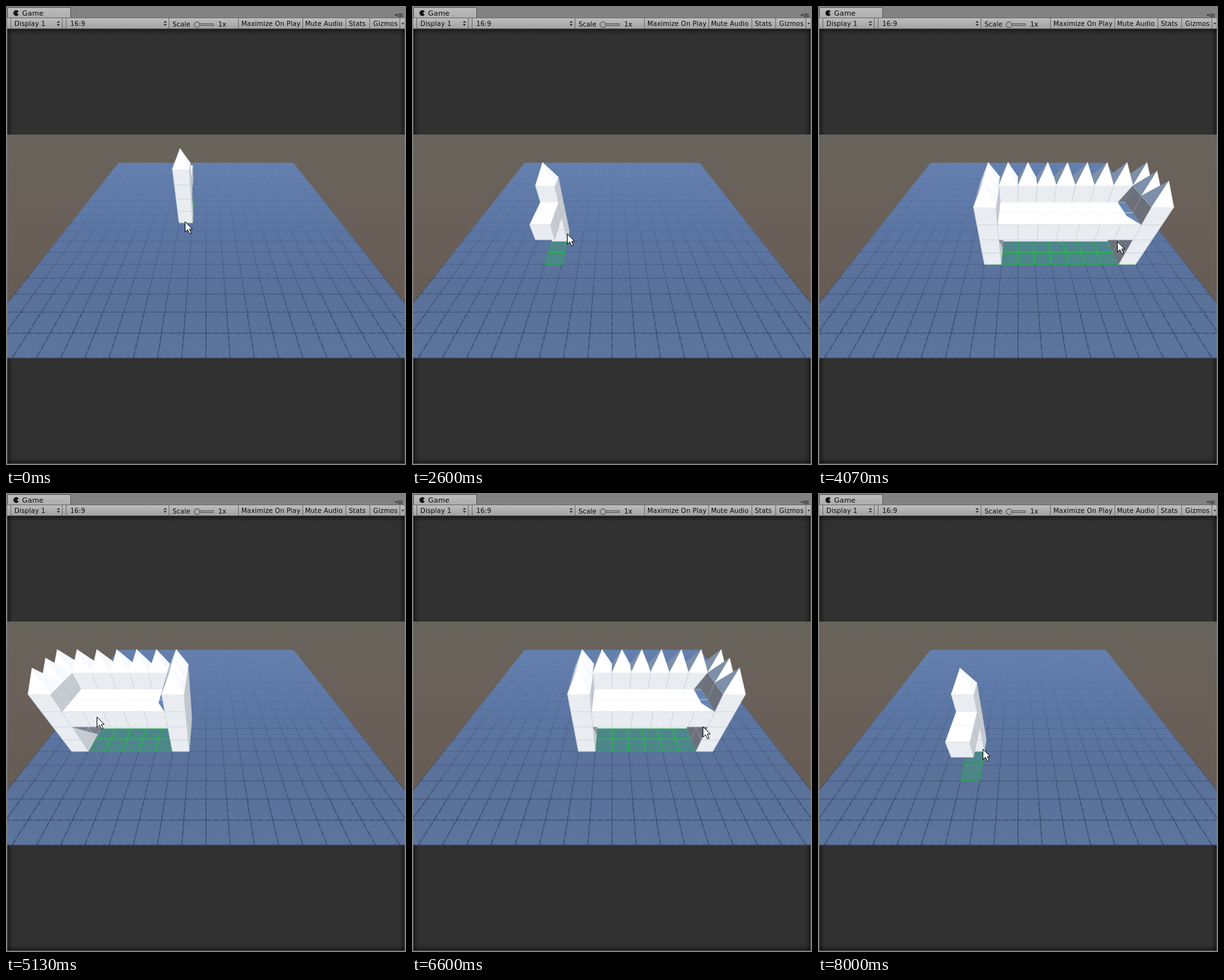
An HTML page with a canvas that plays this animation: 622 px wide and 714 px high, repeating every 8.99 s.

```html
<!DOCTYPE html>
<html lang="en">
<head>
<meta charset="utf-8">
<title>Wall builder</title>
<style>
html, body { margin: 0; width: 100%; height: 100%; overflow: hidden; background: #828282; }
canvas { display: block; }
</style>
</head>
<body>
<canvas id="stage" width="622" height="714"></canvas>
<script>
const stage = document.getElementById('stage');
let ctx = stage.getContext('2d');
const LOOP = 8990;

// Camera: pitched 45 degrees, 60 degree field of view; one grid cell is one unit.
const F = 301.4, CX = 311, CY = 374, HEIGHT = 8.915, NEAR = 0.4, S = Math.SQRT1_2;
// Shadow shift per unit of height.
const SX = 0.42, SZ = 0.727;

function project([x, y, row]) {
  const h = HEIGHT - y, z = row + NEAR, sum = h + z;
  return [CX + F * x / (S * sum), CY + F * (h - z) / sum];
}

function cellAt([px, py]) {
  const v = (py - CY) / F, z = HEIGHT * (1 - v) / (1 + v);
  return [Math.floor((px - CX) * S * (HEIGHT + z) / F), Math.floor(z - NEAR)];
}

function trace(points) {
  ctx.beginPath();
  points.forEach(([x, y]) => ctx.lineTo(x, y));
}

function poly(points, fill, line) {
  trace(points.map(project));
  ctx.closePath();
  ctx.fillStyle = fill;
  ctx.fill();
  ctx.strokeStyle = line || fill;
  ctx.lineWidth = line ? 1 : 0.6;
  ctx.stroke();
}

function clipped(face, shadow, fill) {
  ctx.save();
  trace(face.map(project));
  ctx.clip();
  poly(shadow, fill);
  ctx.restore();
}

function rect(x, y, w, h, fill) {
  ctx.fillStyle = fill;
  ctx.fillRect(x, y, w, h);
}

function ramp(x0, y0, x1, y1, ...colors) {
  const g = ctx.createLinearGradient(x0, y0, x1, y1);
  colors.forEach((c, i) => g.addColorStop(i / (colors.length - 1), c));
  return g;
}

function label(text, x, y, size = 10) {
  ctx.font = size + 'px "DejaVu Sans", Verdana, sans-serif';
  ctx.letterSpacing = '0.2px';
  ctx.fillStyle = '#080808';
  ctx.fillText(text, x, y);
}

function triangle(x, y, w, h) {
  ctx.fillStyle = '#333';
  trace([[x, y], [x + w, y], [x + w / 2, y + h]]);
  ctx.fill();
}

function drawEditor() {
  rect(0, 0, 622, 714, '#828282');
  rect(2, 2, 99, 17, '#5c5c5c');
  rect(3, 3, 97, 16, ramp(0, 3, 0, 19, '#bcbcbc', '#adadad'));
  ctx.fillStyle = '#151515';
  ctx.beginPath();
  ctx.moveTo(17, 11);
  ctx.arc(16, 11, 4.5, 0.6, Math.PI * 2 - 0.6);
  ctx.fill();
  label('Game', 25, 15, 11);
  triangle(604, 13, 5, 3);
  for (const y of [12, 14, 16]) rect(609, y, 8, 1, '#333');

  rect(2, 18, 618, 1, '#6a6a6a');
  rect(2, 19, 618, 16, ramp(0, 19, 0, 35, '#bdbdbd', '#a2a2a2'));
  rect(2, 35, 618, 1, '#484848');
  for (const x of [7, 87, 93, 253, 361, 461, 528, 565, 612]) rect(x, 19, 1, 16, '#696969');
  label('Display 1', 13, 31);
  label('16:9', 100, 31);
  label('Scale', 259, 32);
  label('1x', 330, 32);
  label('Maximize On Play', 366, 31);
  label('Mute Audio', 465, 31);
  label('Stats', 533, 31);
  label('Gizmos', 571, 31);
  for (const x of [79, 245]) {
    triangle(x, 26, 5, -3);
    triangle(x, 28, 5, 3);
  }
  triangle(615, 26, 4, 3);
  rect(298, 27, 25, 4, '#5d5d5d');
  rect(299, 28, 23, 2, '#979797');
  ctx.beginPath();
  ctx.arc(297, 29, 4.5, 0, 7);
  ctx.fillStyle = '#a9a9a9';
  ctx.fill();
  ctx.strokeStyle = '#454545';
  ctx.lineWidth = 1;
  ctx.stroke();

  rect(2, 36, 618, 676, '#313131');
  const dark = 'rgba(0,0,0,.4)', none = 'rgba(0,0,0,0)';
  rect(2, 36, 618, 9, ramp(0, 36, 0, 45, dark, none));
  rect(2, 703, 618, 9, ramp(0, 712, 0, 703, dark, none));
  rect(2, 36, 9, 676, ramp(2, 0, 11, 0, dark, none));
  rect(611, 36, 9, 676, ramp(620, 0, 611, 0, dark, none));
}

function gridLine(a, b, alpha) {
  const [p, q] = [project(a), project(b)];
  ctx.strokeStyle = `rgba(38,50,76,${alpha})`;
  trace([p, q]);
  ctx.stroke();
}

function drawGround() {
  ctx.save();
  ctx.beginPath();
  ctx.rect(2, 200, 618, 348);
  ctx.clip();
  rect(2, 200, 618, 348, ramp(0, 200, 0, 460, '#68645c', '#6a6059', '#665c54'));
  poly([[-10, 0, 22], [10, 0, 22], [10, 0, 2], [-10, 0, 2]],
    ramp(0, 244, 0, 548, '#6581b0', '#5c76a4', '#5a7199', '#5c759d'));
  for (let z = 2; z < 22; z++) {
    const strength = Math.min(1, 6 / (z + 3)) ** 1.2;
    ctx.lineWidth = 0.7 + strength;
    for (let x = -10; x <= 10; x++) {
      gridLine([x, 0, z], [x, 0, z + 1], 0.3 * strength);
      if (x < 10) gridLine([x, 0, z], [x + 1, 0, z], 0.3 * strength);
      if (z > 9) continue;
      for (const k of [0, 0.35, 0.7]) {
        gridLine([x, 0, z + k], [x, 0, z + k + 0.2], 0.3 * strength);
        if (x < 10) gridLine([x + k, 0, z], [x + k + 0.2, 0, z], 0.3 * strength);
      }
    }
  }
  ctx.restore();
}

const SEAM = 'rgba(135,145,160,.22)';

function cube(x, y, z, shadows) {
  const X = x + 1, Y = y + 1, Z = z + 1;
  const side = px => [[px, y, z], [px, Y, z], [px, Y, Z], [px, y, Z]];
  const face = (points, fill, seam) => {
    poly(points, fill);
    if (seam) poly(points, 'rgba(0,0,0,0)', SEAM);
  };
  if (x > 0) face(side(x), '#6c707b', SEAM);
  if (X < 0) {
    face(side(X), '#c6cbd2', SEAM);
    if (shadows.side) clipped(side(X), shadows.side, '#7b7f8d');
  }
  const top = [[x, Y, z], [X, Y, z], [X, Y, Z], [x, Y, Z]];
  face(top, '#fff');
  if (shadows.top) clipped(top, shadows.top, '#6585b7');
  face([[x, y, z], [X, y, z], [X, Y, z], [x, Y, z]], '#e9edf2', SEAM);
  if (shadows.front) poly(shadows.front, '#707680');
}

function pyramid(x, z) {
  const peak = [x + 0.5, 5, z + 0.5];
  const base = [[x, 4, z], [x + 1, 4, z], [x + 1, 4, z + 1], [x, 4, z + 1]];
  const fills = ['#fff', '#f6f9fd', '#dfe5ec', '#7d8fa9'];
  for (const i of [2, 3, 1, 0]) {
    const tri = [base[i], base[(i + 1) % 4], peak];
    const [a, b, c] = tri.map(project);
    const turn = (b[0] - a[0]) * (c[1] - a[1]) - (b[1] - a[1]) * (c[0] - a[0]);
    if (turn < 0) poly(tri, fills[i]);
  }
}

// Cells of the structure: tall wall columns and raised platform cells.
function layout({ cell: [x, z], dir: [dx, dz], drag }) {
  const cells = [];
  if (drag && x !== -2) {
    const a = Math.min(x, -2), b = Math.max(x, -2);
    for (let row = 7; row <= 9; row++)
      for (let i = a; i <= b; i++)
        cells.push({ x: i, z: row, wall: i === a || i === b || row === 9 });
  } else {
    const row = drag ? 9 : z;
    for (let i = 0; i < 3; i++) cells.push({ x: x + dx * i, z: row + dz * i, wall: !i });
  }
  return cells;
}

function drawStructure(cells) {
  const find = (x, z) => cells.find(c => c.x === x && c.z === z);
  const isWall = (x, z) => find(x, z)?.wall === true;
  const isDeck = (x, z) => find(x, z)?.wall === false;
  const front = Math.min(...cells.map(c => c.z));
  for (const { x, z } of cells)
    poly([[x, 0, z], [x + 1, 0, z], [x + 1, 0, z + 1], [x, 0, z + 1]],
      'rgba(58,162,107,.4)', 'rgba(24,205,48,.85)');

  const blocks = cells.flatMap(c => (c.wall ? [0, 1, 2, 3, 4] : [2]).map(y => ({ ...c, y })));
  blocks.sort((a, b) => b.z - a.z || a.y - b.y || Math.abs(b.x + 0.5) - Math.abs(a.x + 0.5));
  for (const { x, y, z, wall } of blocks) {
    if (y === 4) {
      pyramid(x, z);
      continue;
    }
    const X = x + 1, shadows = {};
    if (wall && y < 2 && isDeck(X, z))
      shadows.side = [[X, 2, front], [X, 0, front + 2 * SZ], [X, 0, front + 4], [X, 2, front + 4]];
    if (!wall && isWall(X, z))
      shadows.top = [[X, 3, front], [X - SX, 3, front + SZ], [X - SX, 3, front + 4], [X, 3, front + 4]];
    if (wall && y === 3 && isDeck(x, z - 1) && isWall(X, z - 1))
      shadows.front = [[X, 4, z], [X - SX, 3, z], [X, 3, z]];
    cube(x, y, z, shadows);
  }
}

function drawCursor([x, y]) {
  ctx.save();
  ctx.translate(Math.round(x) + 0.5, Math.round(y) + 0.5);
  trace([[0, 0], [0, 16], [4, 12.5], [7, 19], [9.5, 18], [6.8, 11.5], [11.5, 11.5]]);
  ctx.closePath();
  ctx.fillStyle = '#fff';
  ctx.fill();
  ctx.strokeStyle = '#000';
  ctx.lineWidth = 1;
  ctx.stroke();
  ctx.restore();
}

// Pointer moves: start, end, steps, dragging, evenly timed path.
const moves = [
  [0, 1, 2, false, [[278, 335], [278, 335]]],
  [930, 1600, 11, false, [[278, 335], [245, 370], [212, 410], [210, 413]]],
  [1870, 2730, 13, false,
    [[210, 413], [165, 413], [190, 411], [195, 385], [207, 346], [225, 356], [257, 352]]],
  [2800, 3000, 4, false, [[257, 352], [277, 357]]],
  [3330, 4070, 12, true, [[277, 357], [465, 366]]],
  [4270, 5130, 14, true, [[465, 366], [141, 348]]],
  [5600, 6470, 14, true, [[141, 348], [425, 364]]],
  [6530, 6670, 3, true, [[425, 364], [451.6, 363]]],
  [6870, 7130, 5, true, [[451.6, 363], [345, 364]]],
  [7400, 8000, 9, false, [[345, 364], [256, 398]]],
];

function along(path, u) {
  const s = Math.min(1, u) * (path.length - 1), i = Math.min(path.length - 2, Math.floor(s));
  return path[i].map((a, k) => a + (path[i + 1][k] - a) * (s - i));
}

function stateAt(t) {
  const [start, end, steps, drag, path] = moves.findLast(m => m[0] <= t);
  const last = steps - 1;
  const k = Math.min(last, Math.floor((t - start) / (end - start) * last + 0.02));
  const dir = t < 1465 ? [0, 1] : t < 2156 ? [1, 0] : [0, -1];
  // The pointer runs one step ahead of the structure.
  return { cell: cellAt(along(path, k / last)), cursor: along(path, (k + 1) / last), dir, drag };
}

const backdrop = document.createElement('canvas');
backdrop.width = 622;
backdrop.height = 714;
const screen2d = ctx;
ctx = backdrop.getContext('2d');
drawEditor();
drawGround();
ctx = screen2d;
ctx.lineJoin = 'round';

function frame() {
  const state = stateAt(performance.now() % LOOP);
  ctx.drawImage(backdrop, 0, 0);
  drawStructure(layout(state));
  drawCursor(state.cursor);
  requestAnimationFrame(frame);
}
frame();
</script>
</body>
</html>
```
